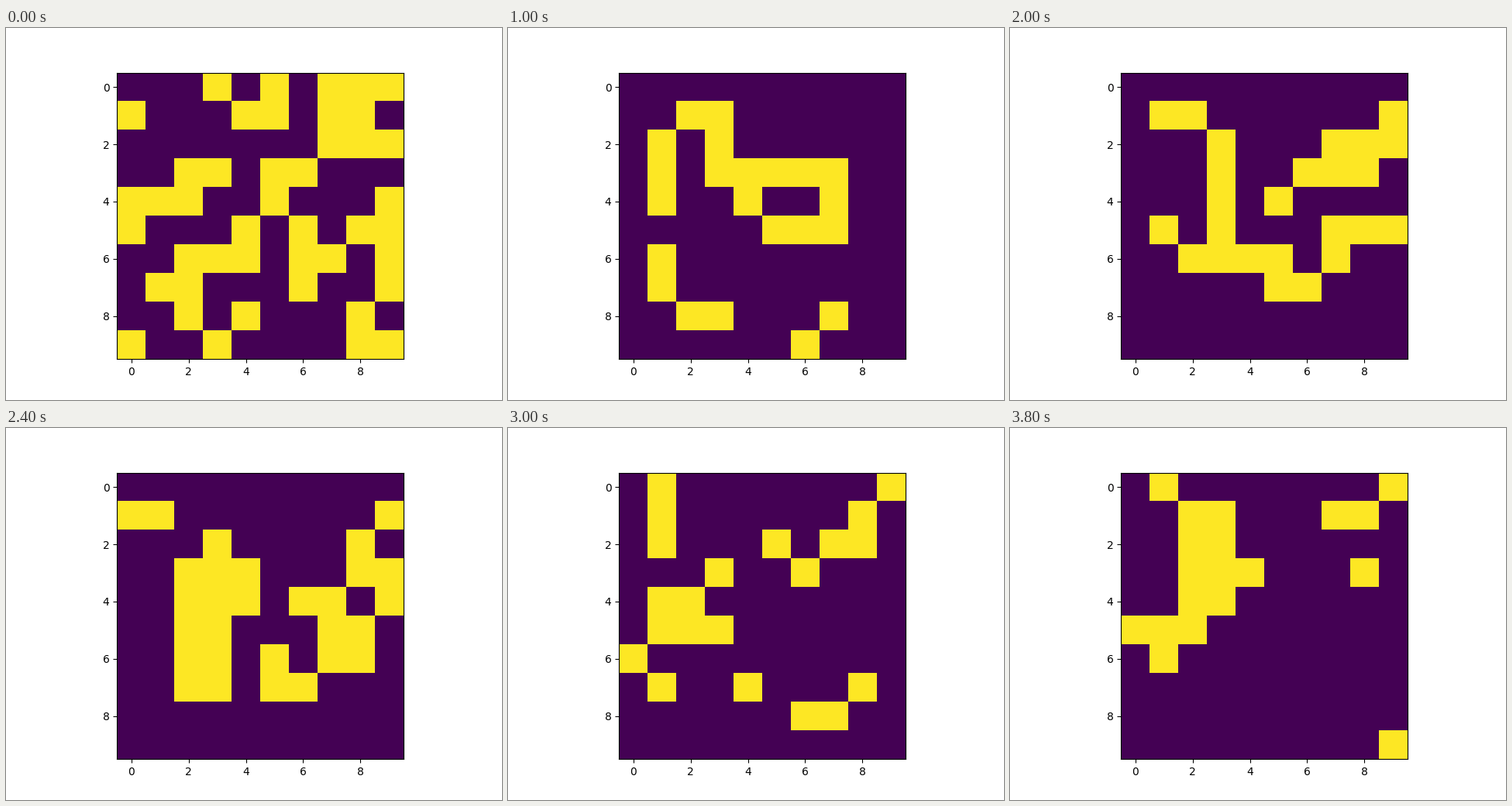
Animation of 640x480 px, one loop 4000 ms. Source, as a matplotlib script:

```python
import numpy as np
import matplotlib.pyplot as plt
from matplotlib.animation import FuncAnimation

SIZE = 10
STEPS = 20
INTERVAL = 200

# Columns of the live cells in each row of the first generation
SEED_ROWS = ["35789", "04578", "789", "2356", "01259",
             "04689", "234679", "1269", "248", "0389"]


def first_generation():
    grid = np.zeros((SIZE, SIZE), dtype=int)
    for row, cols in enumerate(SEED_ROWS):
        grid[row, [int(c) for c in cols]] = 1
    return grid


def next_generation(grid):
    """One step of Conway's Game of Life on a torus."""
    neighbours = sum(np.roll(grid, (dy, dx), axis=(0, 1))
                     for dy in (-1, 0, 1) for dx in (-1, 0, 1)
                     if (dy, dx) != (0, 0))
    alive = (neighbours == 3) | ((grid == 1) & (neighbours == 2))
    return alive.astype(int)


generations = [first_generation()]
while len(generations) < STEPS:
    generations.append(next_generation(generations[-1]))

fig, ax = plt.subplots(figsize=(6.4, 4.8), dpi=100)
image = ax.imshow(generations[0], cmap="viridis", vmin=0, vmax=1,
                  interpolation="nearest")


def update(step):
    image.set_data(generations[step])
    return [image]


anim = FuncAnimation(fig, update, frames=STEPS, interval=INTERVAL,
                     repeat=True, repeat_delay=0, blit=False)
plt.show()
```
